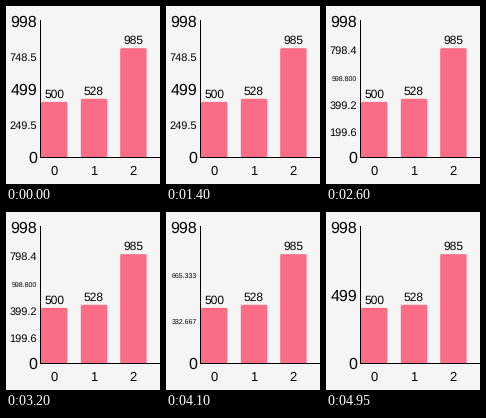
A matplotlib script that plays this animation: 154 px wide and 178 px high, repeating every 5000 ms.

```python
import matplotlib.pyplot as plt
from matplotlib.animation import FuncAnimation
from matplotlib.patches import FancyBboxPatch

plt.rcParams["font.family"] = "Liberation Sans"
plt.rcParams["text.hinting"] = "none"
plt.rcParams["text.hinting_factor"] = 1

W, H, DPI = 154, 178, 100
INTERVAL, LOOP = 50, 5000
BACKGROUND, BAR, INK = "#f5f5f5", "#fb6c87", "#000000"
VALUES = [500, 528, 985]
CENTERS = [48.2, 88, 127.4]
BASE, TOP_BASELINE, BOTTOM_BASELINE = 151.3, 20.8, 156.8
LABEL_RIGHT, LABEL_WIDTH, MAX_SIZE = 31.2, 26.3, 15.8
TEXT_SIZE = 12.3

# Axis labels between the extremes, from low to high.
INNER = {
    2: ["499"],
    3: ["332.667", "665.333"],
    4: ["249.5", "499", "748.5"],
    5: ["199.6", "399.2", "598.800", "798.4"],
}
DIVISIONS = [(0, 4), (2300, 5), (3600, 4), (4100, 3), (4850, 2)]

fig = plt.figure(figsize=(W / DPI, H / DPI), dpi=DPI, facecolor=BACKGROUND)
ax = fig.add_axes([0, 0, 1, 1])
ax.set_xlim(0, W)
ax.set_ylim(H, 0)
ax.axis("off")


def points(px):
    return px * 72 / DPI


def put_text(x, y, text, size, align):
    return ax.text(x, y, text, size=points(size), color=INK,
                   ha=align, va="baseline")


def put_line(xs, ys):
    ax.plot(xs, ys, color=INK, lw=points(1), snap=False,
            solid_capstyle="butt")


def fitted_size(text):
    """Shrink long numbers until they fit the axis column."""
    ems = sum(0.278 if c == "." else 0.556 for c in text)
    return min(MAX_SIZE, LABEL_WIDTH / ems)


def axis_label(text, fraction):
    y = BOTTOM_BASELINE + fraction * (TOP_BASELINE - BOTTOM_BASELINE)
    return put_text(LABEL_RIGHT, y, text, fitted_size(text), "right")


for i, (value, x) in enumerate(zip(VALUES, CENTERS)):
    height = value * 0.1108
    top = BASE - height
    ax.add_patch(FancyBboxPatch((x - 13.2, top), 26.4, height, fc=BAR, ec="none",
                                boxstyle="round,pad=0,rounding_size=1.3"))
    put_text(x, top - 4.2, str(value), TEXT_SIZE, "center")
    put_text(x, 168.6, str(i), TEXT_SIZE + 0.5, "center")

put_line([34.5, 34.5], [14, 152])
put_line([34, W], [151.5, 151.5])
axis_label("998", 1)
axis_label("0", 0)

inner_labels = {
    n: [axis_label(text, k / n) for k, text in enumerate(texts, 1)]
    for n, texts in INNER.items()
}


def update(frame):
    t = frame * INTERVAL
    current = [n for start, n in DIVISIONS if start <= t][-1]
    for n, labels in inner_labels.items():
        for label in labels:
            label.set_visible(n == current)
    return sum(inner_labels.values(), [])


anim = FuncAnimation(fig, update, frames=LOOP // INTERVAL,
                     interval=INTERVAL, repeat=True, repeat_delay=0)
plt.show()
```
